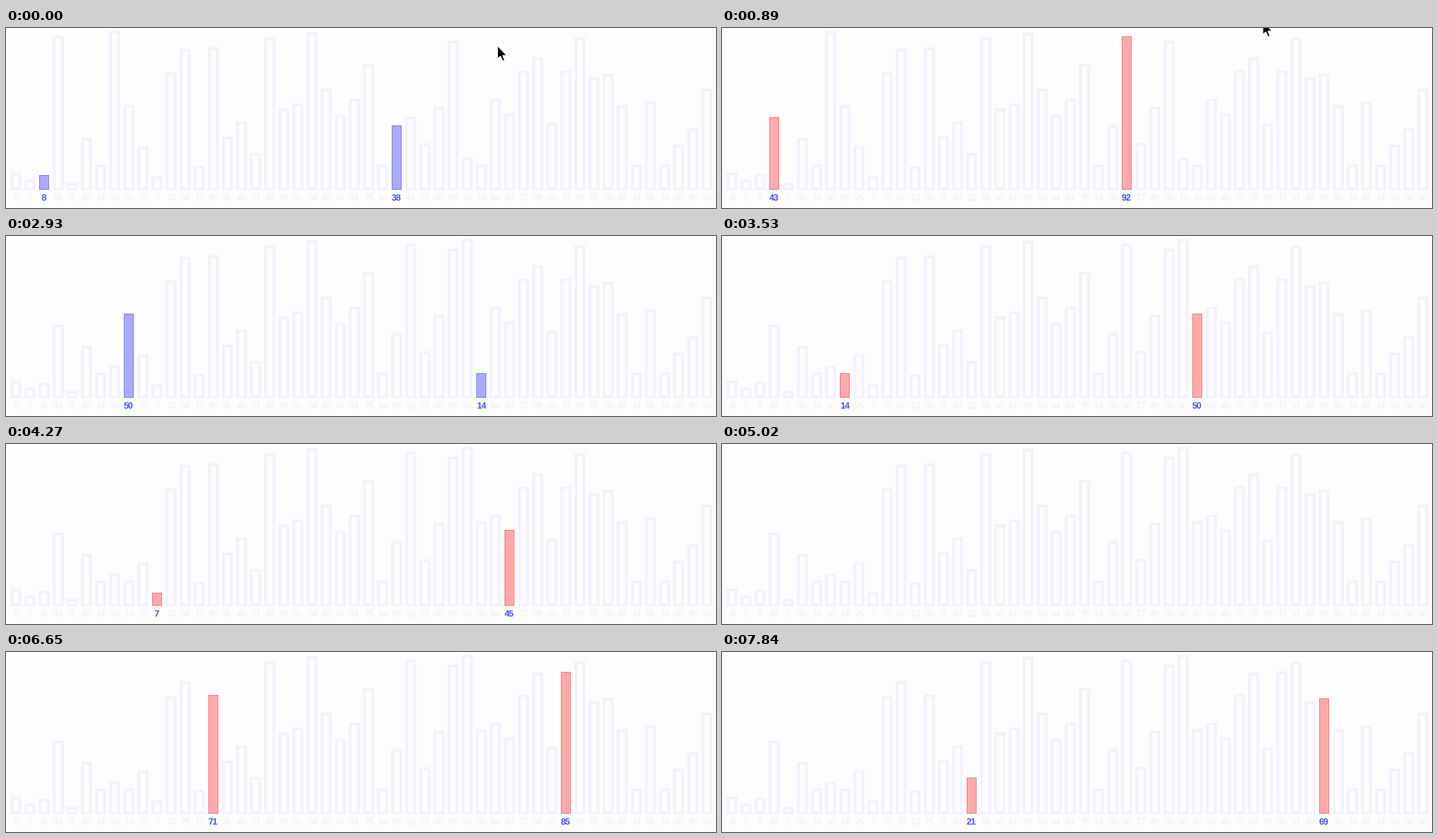
Write a matplotlib script that moves like this. It is 856 by 218 pixels and loops after 8000 ms.

```python
import matplotlib.pyplot as plt
from matplotlib.animation import FuncAnimation
from matplotlib.patches import Polygon, Rectangle

W, H, DPI = 856, 218, 100
LOOP, STEP = 8000, 20
TICK, LEAD = 148, 30      # ms per sorting tick, head start of the first one
GAP, FIRST, LAST = 25, 2, 17
PX = 72 / DPI

# The numbers being sorted
VALUES = [9, 5, 8, 92, 3, 30, 14, 95, 50, 25, 7, 70, 84, 13, 85, 31, 40,
          21, 91, 48, 51, 94, 60, 44, 54, 75, 14, 38, 43, 27, 49, 89, 18,
          14, 54, 45, 71, 79, 39, 71, 91, 67, 69, 50, 14, 52, 14, 26, 36, 60]

BACK = "#fdfdfe"
OUTLINE = "#f2f1ff"
FAINT = "#efeff5"
ACTIVE = "#4353ff"
BLUE = ("#aaaaff", "#8686f2")
RED = ("#ffaaaa", "#f48686")

ARROW = [(0, 0), (0, 16), (3.6, 12.8), (6.3, 18.6), (8.8, 17.5),
         (6.2, 11.9), (11.2, 11.6)]

plt.rcParams["text.hinting"] = "none"


def shell_pass():
    """One (lit index, colours, values) state per tick of a Shell sort pass."""
    vals, color, states = VALUES[:], BLUE, []

    def show(lit, ticks=1):
        states.extend([(lit, color, vals[:])] * ticks)

    def swap(k):
        vals[k], vals[k + GAP] = vals[k + GAP], vals[k]

    for k in range(FIRST, LAST + 1):
        wrong = vals[k] > vals[k + GAP]
        if wrong and color is RED:
            swap(k)
        show(k, 2)
        show(None)
        if wrong and color is BLUE:
            color = RED
            show(k)
            swap(k)
            show(k)
            show(None)
        elif wrong:
            color = BLUE
    return states


def pointer_tip(tick):
    if tick < 7:
        return 592.5, 21.5
    if tick < 10:
        return 652, -8
    if 16 <= tick < 19:
        return 751, 44
    return None


STATES = shell_pass()

fig = plt.figure(figsize=(W / DPI, H / DPI), dpi=DPI, facecolor=BACK)
ax = fig.add_axes([0, 0, 1, 1])
ax.set_xlim(0, W)
ax.set_ylim(H, 0)
ax.axis("off")

centers = [12 + 17 * i for i in range(len(VALUES))]
bars = [ax.add_patch(Rectangle((0, 0), 1, 1, snap=False)) for _ in centers]
labels = [ax.text(x, 209, "", ha="center", va="baseline",
                  family="Liberation Sans", size=10.7 * PX) for x in centers]
pointer = ax.add_patch(Polygon(ARROW, fc="black", ec="white", lw=PX, zorder=5))


def style(i, value, colors):
    if colors:
        half, bottom, width = 5.5, 195.5, 1
        face, edge = colors
    else:
        half, bottom, width = 5, 195, 3
        face, edge = BACK, OUTLINE
    top = bottom - 2 * value - (1 if colors else 0)
    bars[i].set_bounds(centers[i] - half, top, 2 * half, bottom - top)
    bars[i].set(facecolor=face, edgecolor=edge, linewidth=width * PX)
    labels[i].set(text=str(value), color=ACTIVE if colors else FAINT,
                  fontweight="bold" if colors else "normal")


def update(n):
    t = n * STEP + STEP / 2
    tick = int((t + LEAD) // TICK) + 1
    lit, colors, vals = STATES[tick]
    for i, value in enumerate(vals):
        active = lit is not None and i in (lit, lit + GAP)
        style(i, value, colors if active else None)

    tip = pointer_tip(tick)
    pointer.set_visible(tip is not None)
    if tip:
        pointer.set_xy([(tip[0] + x, tip[1] + y) for x, y in ARROW])
    return bars + labels + [pointer]


anim = FuncAnimation(fig, update, frames=LOOP // STEP, interval=STEP,
                     init_func=lambda: update(0), repeat=True, repeat_delay=0)
plt.show()
```
